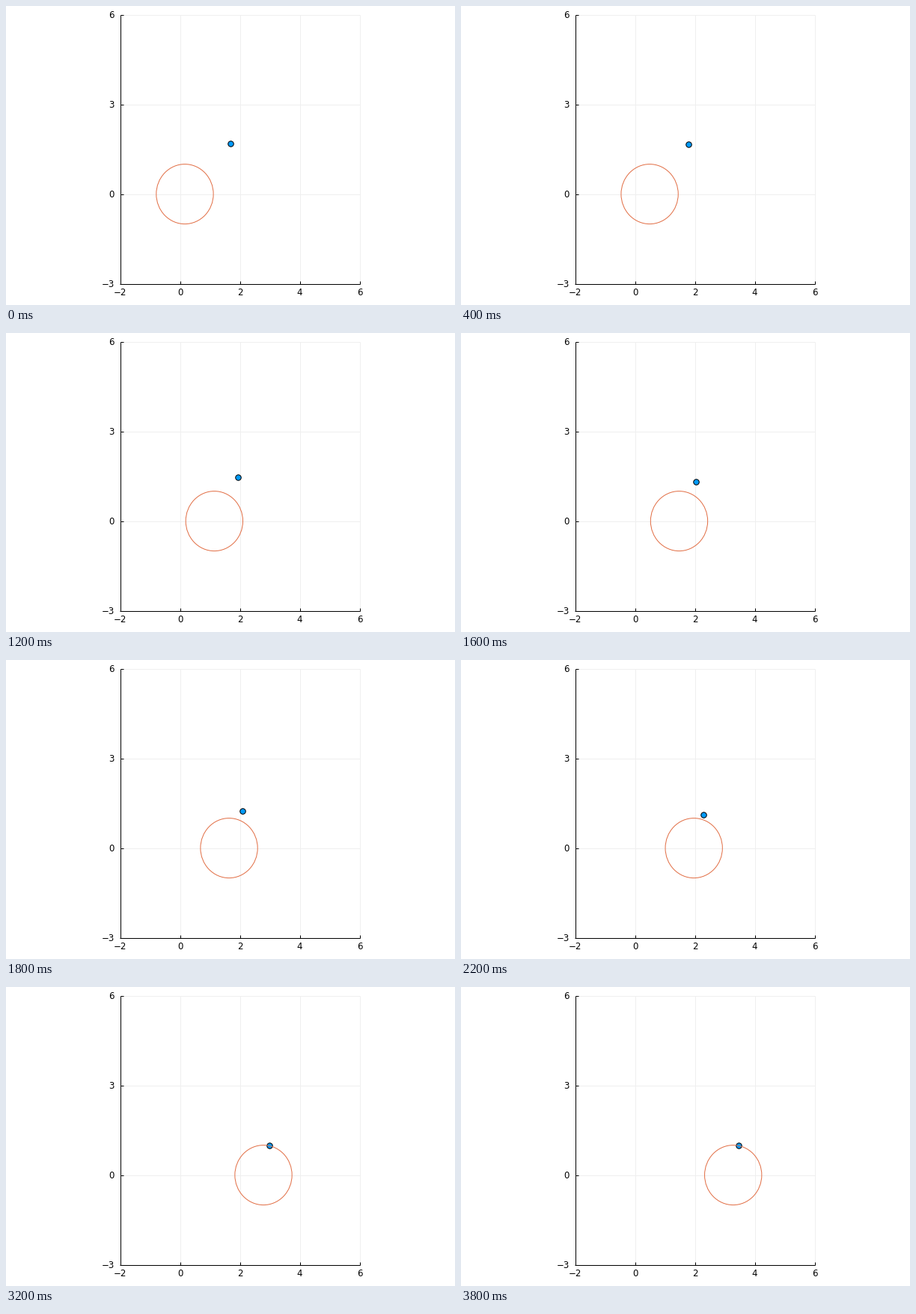
Recreate the animation shown at these times as a matplotlib script. Size 600x400 px, loop 4000 ms.

```python
import numpy as np
import matplotlib.pyplot as plt
from matplotlib.animation import FuncAnimation
from matplotlib.patches import Ellipse

W, H, DPI = 600, 400, 100
FRAMES, INTERVAL = 20, 200
PX = 72 / DPI  # one pixel in points

LEFT, RIGHT, TOP, BOTTOM = 152.5, 472.5, 11.8, 371.6
UNIT = 40
SPEED = 6.565  # pixels per step
ORIGIN = (232.4, 251.6)

# Dot offset from the ring's centre (right, up) at a few steps
STEPS = np.array([0, 2, 6, 9, 11, 14, 16, 19])
RIGHTWARD = np.array([60.6, 51.8, 31.6, 18.4, 12.6, 8.8, 8.0, 7.6])
UPWARD = np.array([67.9, 67.1, 59.1, 49.9, 44.6, 40.6, 39.8, 39.4])


def spline(t, ts, vs):
    """Cubic Hermite interpolation through (ts, vs)."""
    slopes = np.gradient(vs, ts, edge_order=2)
    i = min(np.searchsorted(ts, t, side="right") - 1, len(ts) - 2)
    h = ts[i + 1] - ts[i]
    s = (t - ts[i]) / h
    return ((1 + 2 * s) * (1 - s) ** 2 * vs[i] + s * (1 - s) ** 2 * h * slopes[i]
            + s * s * (3 - 2 * s) * vs[i + 1] + s * s * (s - 1) * h * slopes[i + 1])


plt.rcParams["font.family"] = "DejaVu Sans"
fig = plt.figure(figsize=(W / DPI, H / DPI), dpi=DPI, facecolor="white")
ax = fig.add_axes([0, 0, 1, 1])
ax.set(xlim=(0, W), ylim=(H, 0))
ax.axis("off")


def line(x0, y0, x1, y1, color="black", z=2):
    ax.plot([x0, x1], [y0, y1], color=color, lw=PX, zorder=z,
            solid_capstyle="butt")


def label(x, y, value, ha):
    ax.text(x, y + 4.4, str(value).replace("-", "\u2212"), ha=ha,
            va="baseline", fontsize=11.8 * PX)


GRID = "#efefef"
for v in (-2, 0, 2, 4, 6):
    x = LEFT + (v + 2) * UNIT
    line(x, TOP, x, BOTTOM, GRID, 1)
    line(x, BOTTOM, x, BOTTOM - 4)
    label(x, 383, v, "center")
for v in (-3, 0, 3, 6):
    y = TOP + (6 - v) * (BOTTOM - TOP) / 9
    line(LEFT, y, RIGHT, y, GRID, 1)
    line(LEFT, y, LEFT + 4, y)
    label(145, y, v, "right")
line(LEFT, TOP, LEFT, BOTTOM + 0.5)
line(LEFT - 0.5, BOTTOM, RIGHT + 0.5, BOTTOM)

dot, = ax.plot([], [], "o", ms=7.5 * PX, mfc="#009af9", mec="black",
               mew=PX, zorder=4)
# Width contracted for a speed of 0.3
ring = ax.add_patch(Ellipse(ORIGIN, 2 * UNIT * np.sqrt(1 - 0.3 ** 2), 2 * UNIT,
                            fill=False, ec="#e26f46", lw=PX, zorder=5))


def update(n):
    cx, cy = ORIGIN[0] + SPEED * (n + 1), ORIGIN[1]
    ring.set_center((cx, cy))
    dot.set_data([cx + spline(n, STEPS, RIGHTWARD)],
                 [cy - spline(n, STEPS, UPWARD)])
    return ring, dot


anim = FuncAnimation(fig, update, frames=FRAMES, interval=INTERVAL,
                     repeat=True, repeat_delay=0)
plt.show()
```
